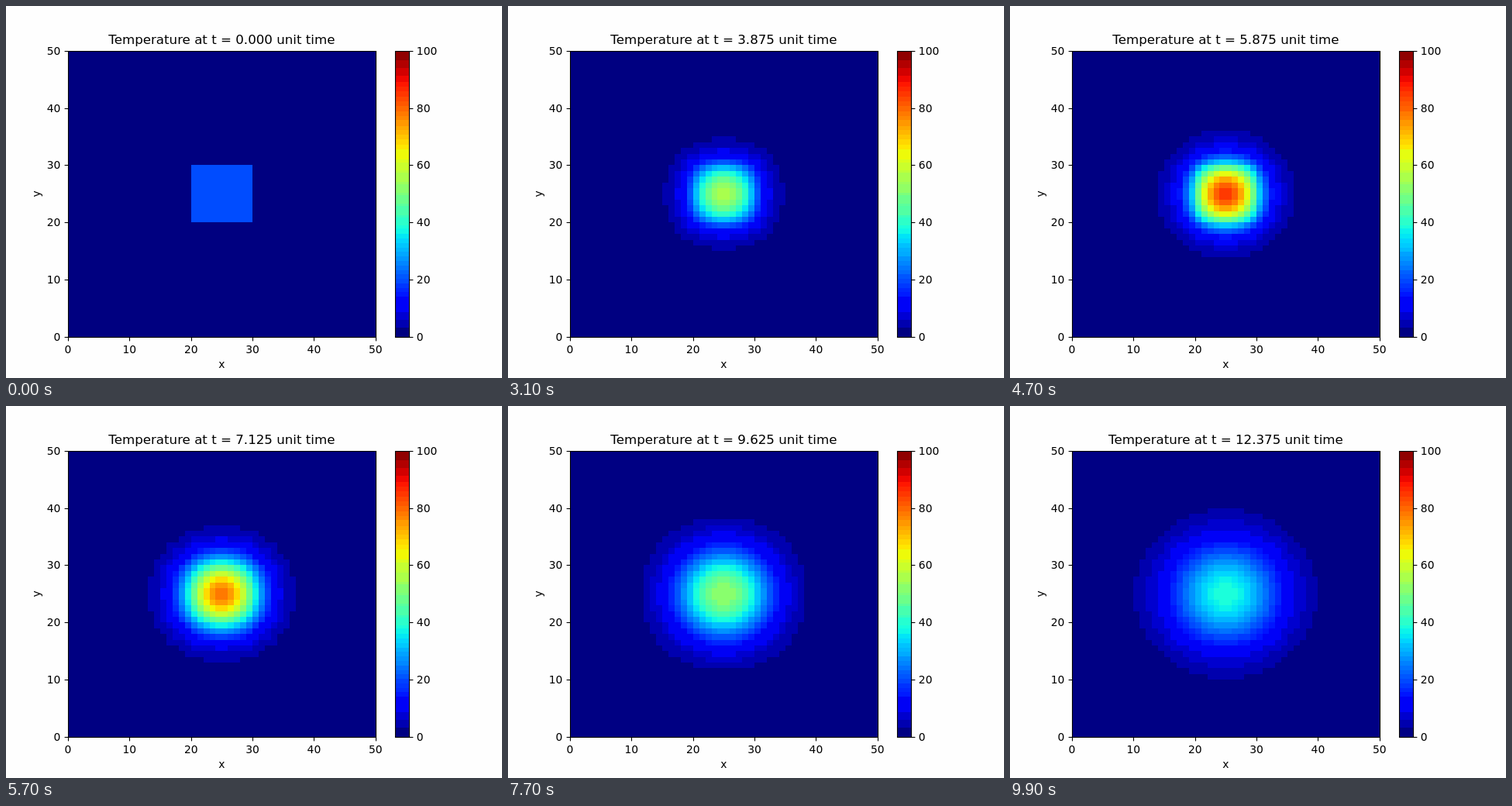
An HTML page with a canvas that plays this animation: 640 px wide and 480 px high, repeating every 10000 ms.

```html
<!DOCTYPE html>
<html lang="en">
<head>
<meta charset="utf-8">
<title>Heat spreading in a plate</title>
<style>
  html, body { margin: 0; width: 100%; height: 100%; overflow: hidden; background: #fefefe; }
  canvas { display: block; }
</style>
</head>
<body>
<canvas id="stage" width="640" height="480"></canvas>
<script>
const ctx = document.getElementById('stage').getContext('2d');

const N = 50, STEPS = 100, STEP_MS = 100, DT = 0.125;
const HEATED_STEPS = 50, HEAT = 0.05;
const PLOT = { left: 80, right: 476.8, top: 57.6, bottom: 427.2 };
const BAR = { left: 502, right: 520, top: 58, bottom: 427 };
const FONT = '"DejaVu Sans", Verdana, sans-serif';

// Plate simulation: a hot square that feeds itself, then only diffuses
const inSquare = (x, y) => x >= 20 && x < 30 && y >= 20 && y < 30;

function simulate() {
  let u = new Float64Array(N * N);
  for (let y = 0; y < N; y++)
    for (let x = 0; x < N; x++) if (inSquare(x, y)) u[y * N + x] = 20;
  const history = [u];
  for (let k = 0; k < STEPS - 1; k++) {
    const next = new Float64Array(N * N);
    for (let y = 1; y < N - 1; y++) {
      for (let x = 1; x < N - 1; x++) {
        const i = y * N + x;
        next[i] = (u[i - 1] + u[i + 1] + u[i - N] + u[i + N]) / 4;
        if (k < HEATED_STEPS && inSquare(x, y)) next[i] += HEAT * u[i];
      }
    }
    history.push(u = next);
  }
  return history;
}

// Jet colour map as piecewise linear channels
function ramp(stops, x) {
  for (let i = 1; i < stops.length; i++) {
    const [x0, y0] = stops[i - 1], [x1, y1] = stops[i];
    if (x <= x1) return Math.round(255 * (y0 + (y1 - y0) * (x - x0) / (x1 - x0)));
  }
}
const RED = [[0, 0], [0.35, 0], [0.66, 1], [0.89, 1], [1, 0.5]];
const GREEN = [[0, 0], [0.125, 0], [0.375, 1], [0.64, 1], [0.91, 0], [1, 0]];
const BLUE = [[0, 0.5], [0.11, 1], [0.34, 1], [0.65, 0], [1, 0]];
const jet = Array.from({ length: 256 }, (_, i) => [RED, GREEN, BLUE].map(c => ramp(c, i / 255)));
const band = jet.map(([r, g, b]) => (r >> 5) << 7 | (g >> 4) << 3 | b >> 5);

const level = v => Math.max(0, Math.min(255, Math.floor(v * 2.56)));
const edgeX = i => Math.round(PLOT.left + i * (PLOT.right - PLOT.left) / N);
const edgeY = j => Math.round(PLOT.bottom - j * (PLOT.bottom - PLOT.top) / N);

const barLevels = [];
for (let y = BAR.top; y < BAR.bottom; y++)
  barLevels.push(Math.floor((BAR.bottom - y - 0.5) / (BAR.bottom - BAR.top) * 256));

// Each colour band shows the mean of the pixels that fall in it
function bandColors(cells) {
  const sums = {};
  const add = (i, area) => {
    const s = sums[band[i]] ||= [0, 0, 0, 0];
    jet[i].forEach((c, n) => s[n] += c * area);
    s[3] += area;
  };
  barLevels.forEach(i => add(i, BAR.right - BAR.left));
  cells.forEach(i => add(i, 58.66));
  return i => {
    const s = sums[band[i]];
    return `rgb(${s.slice(0, 3).map(c => Math.floor(c / s[3] + 1e-6))})`;
  };
}

function line(x0, y0, x1, y1) {
  ctx.beginPath();
  ctx.moveTo(x0, y0);
  ctx.lineTo(x1, y1);
  ctx.stroke();
}

function text(str, x, y, align = 'center', size = 13.889) {
  ctx.font = `${size}px ${FONT}`;
  ctx.textAlign = align;
  ctx.fillText(str, x, y);
}

function drawAxes() {
  ctx.strokeStyle = ctx.fillStyle = '#000';
  ctx.lineWidth = 1.11;
  ctx.strokeRect(80.5, 58.5, 397, 369);
  ctx.strokeRect(502.5, 58.5, 18, 369);
  for (let n = 0; n <= 5; n++) {
    const x = edgeX(n * 10) + 0.5, y = edgeY(n * 10) + 0.5;
    line(x, 427.5, x, 432.4);
    line(75.6, y, 80.5, y);
    line(520.5, y, 525.4, y);
    text(n * 10, PLOT.left + n * 79.36, 448);
    text(n * 10, 70.3, y + 4.5, 'right');
    text(n * 20, 529.8, y + 4.5, 'left');
  }
  text('x', 278.4, 467);
  ctx.save();
  ctx.translate(44, 242.4);
  ctx.rotate(-Math.PI / 2);
  text('y', 0, 0);
  ctx.restore();
}

function draw(k) {
  const cells = Array.from(history[k], level);
  const color = bandColors(cells);
  ctx.fillStyle = '#fefefe';
  ctx.fillRect(0, 0, 640, 480);
  cells.forEach((c, i) => {
    const x = i % N, y = Math.floor(i / N);
    ctx.fillStyle = color(c);
    ctx.fillRect(edgeX(x), edgeY(y + 1), edgeX(x + 1) - edgeX(x), edgeY(y) - edgeY(y + 1));
  });
  barLevels.forEach((c, row) => {
    ctx.fillStyle = color(c);
    ctx.fillRect(BAR.left, BAR.top + row, BAR.right - BAR.left, 1);
  });
  drawAxes();
  text(`Temperature at t = ${(k * DT).toFixed(3)} unit time`, 278.4, 49, 'center', 16.667);
}

const history = simulate();
let shown = -1;
function tick() {
  const k = Math.floor(performance.now() / STEP_MS) % STEPS;
  if (k !== shown) draw(shown = k);
  requestAnimationFrame(tick);
}
tick();
</script>
</body>
</html>
```
